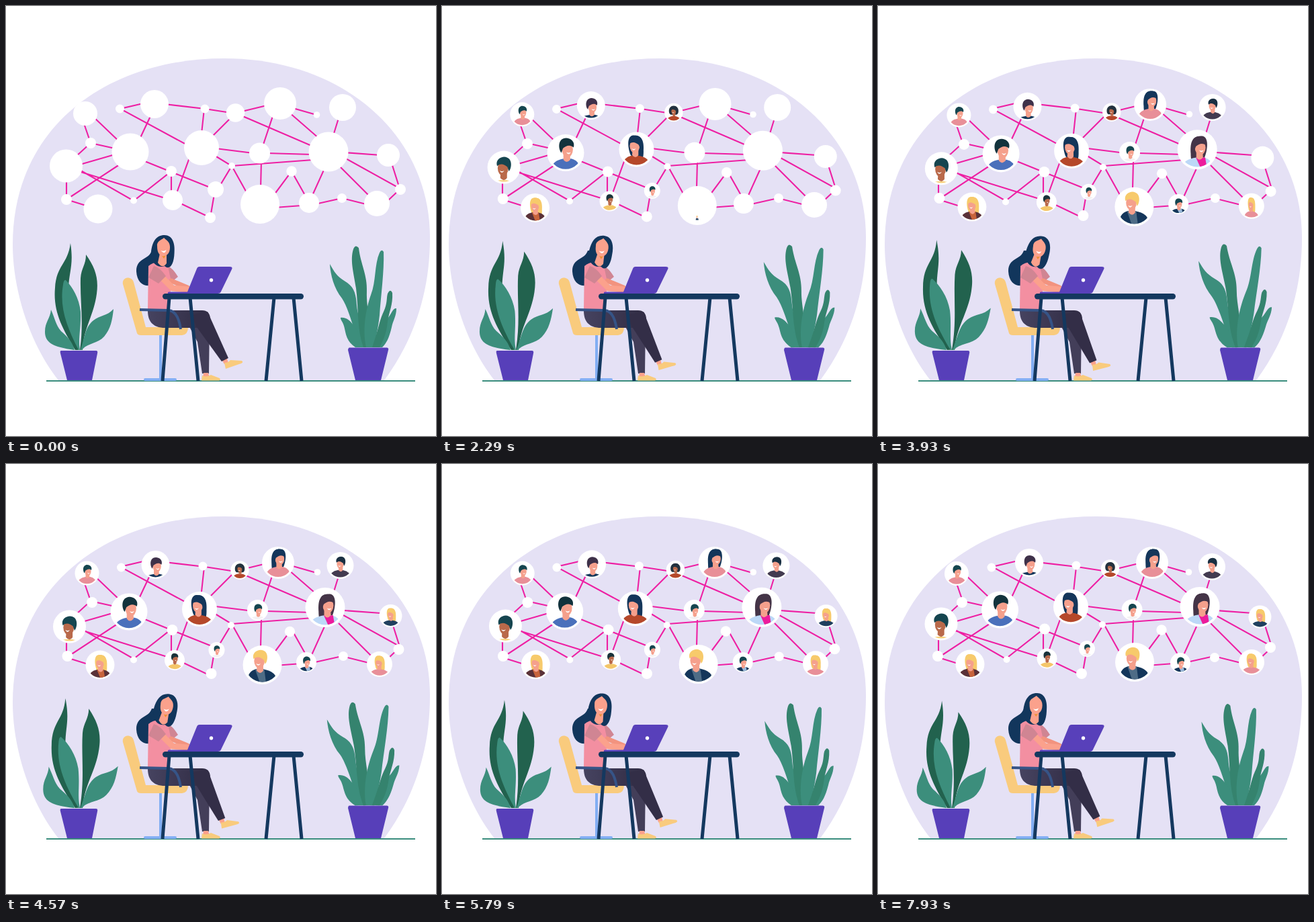
An HTML page that plays this animation: 640 px wide and 640 px high, repeating every 8 s.

```html
<!DOCTYPE html>
<html lang="en">
<head>
<meta charset="utf-8">
<title>Growing network</title>
<style>
  html, body { margin: 0; width: 100%; height: 100%; overflow: hidden; background: #fff; }
  svg { display: block; width: 100vw; height: 100vh; }
</style>
</head>
<body>
<svg viewBox="0 0 640 640">
  <defs>
    <clipPath id="disc"><circle r=".88"/></clipPath>
    <linearGradient id="denim">
      <stop stop-color="#464360"/><stop offset="1" stop-color="#302b43"/>
    </linearGradient>
  </defs>

  <path fill="#e5e1f5" d="M78 557C40 510 10 430 10 355C10 180 150 78 325 78C500 78 631 190 631 345C631 430 605 500 563 557Z"/>

  <g fill="none" stroke="#ee1fa3" stroke-width="2.1">
    <path d="M128 163L172 205M115 172L126 204L104 224M126 204L162 212M204 145L170 153L270 207M215 164L199 198M236 146L296 153L335 159M295 153L291 190M336 165L305 196M110 236L162 221M90 288L172 234M204 230L246 247L306 271M90 256V288L122 298M108 243L190 290L246 246V280M108 246L240 287M273 226L253 281M258 293L304 315L310 280M318 268L336 238L308 221"/>
    <path d="M351 157L388 148M350 163L457 209M397 164L382 209M421 158L467 198M427 152L462 162M495 167L487 193M336 238L457 229M336 238L360 281M312 212L368 219M387 219L456 221M380 230L379 272M399 281L425 246L447 285M474 242L455 284M400 300L440 297M460 295L500 286L540 296M503 218L558 222M502 225L587 272L567 291M495 237L544 286M574 234L586 272"/>
  </g>
  <g id="network"></g>
  <g id="plants"></g>

  <g fill="#573fb9">
    <path d="M82 513H134Q137 513 136 517L128 557H91L81 517Q80 513 82 513Z"/>
    <path d="M511 508.500H567Q570 509 569 512L558 557H520L509 512Q509 509 511 508.500Z"/>
  </g>
  <path d="M60 558H609" stroke="#3a8d7d" stroke-width="2"/>

  <!-- chair -->
  <path d="M230 488V555M207 556H252" stroke="#82aef3" stroke-width="4" stroke-linecap="round"/>
  <path d="M174 414C172 403 187 401 190 411L208 478H271Q271 489 262 490H201Q196 490 195 487Z" fill="#f9cb7d"/>

  <!-- seated woman -->
  <path d="M217 364C212 379 194 374 194 395C195 411 204 418 216 416L240 390V365Z" fill="#12365c"/>
  <path d="M270 472L303 470L302 547L292 547L285 500Z" fill="#433e59"/>
  <path d="M294 546H301L303 553H293Z" fill="#fba18c"/>
  <path d="M292 550Q298 553 305 549L318 554Q320 557 317 557.500H291Z" fill="#f9cb7d"/>
  <path d="M211 453H292Q303 453 304 465L295 479H240C217 480 211 468 211 453Z" fill="url(#denim)"/>
  <g id="shin">
    <path d="M320 524L328 522L331 531L325 533Z" fill="#fba18c"/>
    <path d="M276 460L300 455L331 524L321 529L284 478Z" fill="#332e47"/>
    <path d="M325 531Q331 531 334 527L351 528Q355 531 347 533L327 540Z" fill="#f9cb7d"/>
  </g>
  <path d="M212 387Q221 380 231 382L243 388L247 412L241 452H211Z" fill="#f38fa1"/>
  <path d="M241 387Q248 390 256 403L246 411Z" fill="#d08593"/>
  <path d="M246 409L270 419" stroke="#f2937f" stroke-width="7" stroke-linecap="round"/>
  <g id="head">
    <path d="M236 341C223 341 218 351 216 365C214 381 225 391 236 387C244 394 250 384 250.500 368C252 352 247 341 236 341Z" fill="#12365c"/>
    <path d="M229 368L239 366L239 383Q233 392 226 382Z" fill="#fba18c"/>
    <path d="M230 369H239L235 376Z" fill="#ed9133"/>
    <path d="M225 358C224 350 230 349 235 345C239 349 244 351 244 359C244 371 236 373 232 372C227 370 225 365 225 358Z" fill="#fba18c"/>
    <path d="M230.500 364Q235 366 238.500 363Q236 371 230.500 364Z" fill="#fff"/>
  </g>
  <path d="M231 403L248 420L270 422" fill="none" stroke="#fba18c" stroke-width="9" stroke-linecap="round" stroke-linejoin="round"/>
  <path d="M220 387Q229 389 238 402L227 413L212 404Z" fill="#d08593"/>
  <path d="M199 452L242 453Q256 454 260 481" fill="none" stroke="#365487" stroke-width="4"/>

  <!-- desk and laptop -->
  <path d="M243 434L233 558M274 434L286 558M399 434L387 558M428 434L440 558" stroke="#14385f" stroke-width="5"/>
  <rect x="233" y="428" width="210" height="8.500" rx="4.200" fill="#14385f"/>
  <path d="M288 388H333Q338 388 336 392L320 425Q319 428 315 428H241Q240 425.500 243 425.500H270L284 391Q285 388 288 388Z" fill="#5840ba"/>
  <circle cx="305.500" cy="408" r="2.700" fill="#fff"/>
</svg>

<script>
const LOOP = 8000;
const byId = id => document.getElementById(id);
const clamp = v => Math.max(0, Math.min(1, v));
const easeInOut = v => (1 - Math.cos(Math.PI * clamp(v))) / 2;

function add(parent, tag, attrs) {
  const el = document.createElementNS('http://www.w3.org/2000/svg', tag);
  for (const key in attrs) el.setAttribute(key, attrs[key]);
  return parent.appendChild(el);
}
const move = (el, value) => el.setAttribute('transform', value);

// x, y, radius
const places = {
  A: [118, 160, 18], B: [169.5, 153, 6.5], C: [221, 146, 21], D: [296, 153, 6.5],
  E: [341.5, 159, 13.7], F: [408, 145, 24], G: [462.5, 162, 4.8], H: [501, 151, 20],
  I: [126, 204, 8], J: [185, 217, 27.5], K: [89.5, 238, 24.5], L: [291, 211, 26],
  M: [377.5, 219, 15.5], N: [480, 217, 29.5], O: [569, 222, 17], P: [246, 246, 8],
  Q: [336, 238, 5], R: [425, 246, 7.7], S: [587, 273, 8], T: [312, 273, 12],
  U: [378, 295, 29], V: [451, 293, 15], W: [500, 286, 7], X: [552, 294, 19],
  Y: [137, 302, 21.5], Z: [90, 288, 8], a: [190, 289.5, 5], b: [248, 289, 15],
  c: [304, 315, 8]
};
// offset at the turn (dx, dy), then at the end (dx, dy)
const drifts = {
  A: [2.5, 2.5, -1, 3], B: [2, 1, -.5, 1], C: [1.5, 4, 4, 1], D: [-3, -1, -1, -2],
  E: [6.5, -1, 4, -3], F: [-3, 2, 0, 2], G: [1, -1, 0, -1], H: [-3.5, 0, -4, 2],
  I: [2, 2, -1, 2], J: [-2, 3, -3.5, 0], K: [5, 4, 4.5, 0], L: [-3, 5, -4, 1.5],
  M: [-3, -1.5, .5, -2], N: [-5, -3.5, -1, -4.5], O: [3.5, 4, -.5, 5.5], P: [1.5, 1, 2, -.5],
  Q: [-1, 2, -2, 1], R: [-2.5, 3.5, -3, 1], S: [-2.5, 3, -3, 0], T: [1.5, 4, -1, 2],
  U: [3.5, 4, 4, 0], V: [-4, 2, -1, 3], W: [2, 0, 1, 2], X: [4, 4, 4, 1],
  Y: [3, -3, 0, -4], Z: [1.5, -2, -1, -2], a: [0, 2, 1.5, 1.5], b: [3, 3, 3.5, .5],
  c: [1.5, -3, -1, -3]
};

const LIGHT = '#f5a08c', BROWN = '#b9694a', NAVY = '#14365a', TEAL = '#15454f';
const BLOND = '#f7ca6b', PINK = '#e88f98', RUST = '#b5482a', PALE = '#f4f1f3';
// In order of appearance: node, skin, hair, shirt, x, y, size, shirt top, hair side, style, accent
const people = [
  ['K', BROWN, TEAL, '#f6cf78', -.05, .05, 1.2, .78, 1, 'short'],
  ['A', LIGHT, TEAL, PINK, .08, -.15, .95, .3, -1, 'short'],
  ['Y', LIGHT, BLOND, '#5a3138', 0, -.12, 1, .32, 1, 'long', '#c8643c'],
  ['J', LIGHT, '#12323c', '#4a70bb', .1, -.18, 1.1, .32, -1, 'short'],
  ['C', LIGHT, '#3e3149', NAVY, .1, .1, 1.1, .66, -1, 'short'],
  ['b', BROWN, '#19323a', '#f4c669', .05, -.15, .95, .4, -1, 'short'],
  ['L', LIGHT, NAVY, RUST, -.1, -.2, 1.05, .35, 1, 'long'],
  ['T', LIGHT, TEAL, PALE, .08, 0, 1, .6, -1, 'short'],
  ['E', BROWN, '#23323f', RUST, 0, -.15, .95, .4, 1, 'curly'],
  ['U', LIGHT, BLOND, NAVY, -.15, -.2, 1, .22, 1, 'short', '#4e6c86'],
  ['F', LIGHT, NAVY, PINK, .1, -.25, 1.05, .25, -1, 'long'],
  ['H', LIGHT, '#1a2f42', '#433b50', 0, -.12, .95, .35, 1, 'short'],
  ['M', LIGHT, TEAL, PALE, .1, .02, 1.05, .6, -1, 'short'],
  ['V', LIGHT, TEAL, NAVY, .08, 0, 1, .45, -1, 'short', '#9bb9d9'],
  ['N', LIGHT, '#443447', '#bcd8f7', .15, -.1, 1, .4, -1, 'long', '#ec1c9c'],
  ['X', LIGHT, BLOND, PINK, -.05, -.12, .95, .4, 1, 'long'],
  ['O', LIGHT, BLOND, '#20405f', 0, -.12, .95, .4, 1, 'long']
];
const backHair = {
  short: '',
  long: 'M-.1-.58C.5-.62.5-.1.48.3C.48.65.42.8.25.85L-.22.5C-.35.2-.48-.52-.1-.58Z',
  curly: 'M0-.6C.7-.6.65.35.35.4H-.35C-.65.35-.7-.6 0-.6Z'
};
const frontHair = 'M-.3-.1C-.42-.48 0-.64.2-.54C.48-.44.44 0 .3.16L.22-.06C.08-.16-.1-.28-.3-.1Z';

function drawPerson(parent, [, skin, hair, shirt, x, y, size, top, side, style, accent]) {
  const group = add(parent, 'g');
  const headPose = `translate(${x} ${y}) scale(${side * size} ${size})`;
  const back = add(group, 'g', { transform: headPose });
  add(back, 'path', { d: backHair[style], fill: hair });
  add(group, 'path', {
    d: `M-.8 1Q-.78 ${top + .1} ${x - .2} ${top}H${x + .2}Q.78 ${top + .1} .8 1Z`, fill: shirt
  });
  if (accent) add(group, 'path', { d: `M${x - .22} ${top}H${x + .25}L${x + .35} 1H${x + .05}Z`, fill: accent });
  const head = add(group, 'g', { transform: headPose });
  add(head, 'path', { d: 'M-.12.15L.2.05V.5Q.05.72-.14.5Z', fill: skin });
  add(head, 'ellipse', { rx: .27, ry: .38, fill: skin });
  add(head, 'path', { d: frontHair, fill: hair });
  add(head, 'path', { d: 'M-.17.13Q-.05.2.06.13Q-.06.33-.17.13Z', fill: '#fff' });
  return group;
}

const nodes = {};
for (const key in places) {
  const r = places[key][2];
  nodes[key] = add(byId('network'), 'g');
  add(nodes[key], 'circle', { r, fill: '#fff' });
}
const portraits = people.map(person => {
  const r = places[person[0]][2];
  const frame = add(nodes[person[0]], 'g', { transform: `scale(${r})`, 'clip-path': 'url(#disc)' });
  return drawPerson(frame, person);
});

const DEEP = '#22624e', MID = '#3c8e7c', SOFT = '#35836e';
// base x, base y, sway in degrees, stretch, colour, outline
const leaves = [
  [105, 512, -3, .035, DEEP, 'M103 512C84 480 70 455 73 420C75 385 92 385 96 353C101 385 94 395 93 420C92 460 100 480 108 512Z'],
  [112, 512, 1.8, .05, DEEP, 'M110 512C116 470 110 440 111 405C112 390 119 385 119 370C133 390 138 405 135 428C131 460 115 480 114 512Z'],
  [109, 512, -4, .035, MID, 'M108 512C92 480 79 450 85 415Q86 407 89 408C99 418 109 435 111 455C112 480 107 495 110 512Z'],
  [102, 512, -2, .05, MID, 'M101 512C78 508 58 505 58 485C58 470 66 465 67 452C73 465 74 475 82 484C92 493 99 500 102 512Z'],
  [112, 512, 3.6, .08, MID, 'M111 512C118 490 118 478 130 468C140 460 150 462 160 451C158 468 156 480 146 492C136 503 120 502 113 512Z'],
  [533, 508, -1.2, .045, MID, 'M527 508C517 480 510 450 500 435C488 420 483 400 482 384C489 396 492 402 505 410C519 418 521 430 522 445C524 470 538 490 538 508Z'],
  [536, 508, -2.2, .025, SOFT, 'M532 508C522 480 525 450 521 420C517 395 512 378 517 362Q520 354 525 360C528 385 538 400 537 425C536 450 545 480 540 508Z'],
  [542, 508, 3, .05, MID, 'M536 508C530 480 536 450 543 430C551 410 548 385 556 367Q559 361 562 366C563 395 558 430 556 460C554 480 550 495 548 508Z'],
  [525, 508, -3.5, .06, MID, 'M520 508C508 500 506 490 504 480C502 470 498 468 498 464C506 463 512 468 517 475C526 485 530 500 530 508Z'],
  [556, 508, 3.5, .06, MID, 'M552 508C562 490 560 475 568 465C574 458 575 450 581 450C581 462 576 468 574 478C570 495 566 502 560 508Z'],
  [550, 508, 2, .03, SOFT, 'M545 508C555 480 555 470 562 455C568 442 566 435 568 428Q572 420 575 427C576 445 570 455 568 470C566 490 560 500 556 508Z']
].map(([x, y, turn, stretch, fill, d]) => ({ x, y, turn, stretch, el: add(byId('plants'), 'path', { d, fill }) }));

function draw(t) {
  const there = easeInOut(t / 4500);
  const back = easeInOut((t - 4500) / 4500) / .86;
  for (const key in places) {
    const [x, y] = places[key], [mx, my, ex, ey] = drifts[key];
    move(nodes[key], `translate(${x + mx * there + (ex - mx) * back} ${y + my * there + (ey - my) * back})`);
  }

  portraits.forEach((el, i) => {
    const grow = easeInOut((t - i * 247) / 350);
    move(el, `translate(0 .7) scale(${grow} ${Math.min(1, grow * 1.4)}) translate(0 -.7)`);
  });

  const sway = (1 + Math.cos(2 * Math.PI * (t - 3700) / 7000)) / 2;
  for (const { x, y, turn, stretch, el } of leaves) {
    move(el, `translate(${x} ${y}) rotate(${turn * sway}) scale(${1 + stretch * sway}) translate(${-x} ${-y})`);
  }
  move(byId('head'), `rotate(${10 * sway} 230 392)`);
  move(byId('shin'), `rotate(${5 * sway} 290 462)`);
}

function tick() {
  draw(performance.now() % LOOP);
  requestAnimationFrame(tick);
}
tick();
</script>
</body>
</html>
```
